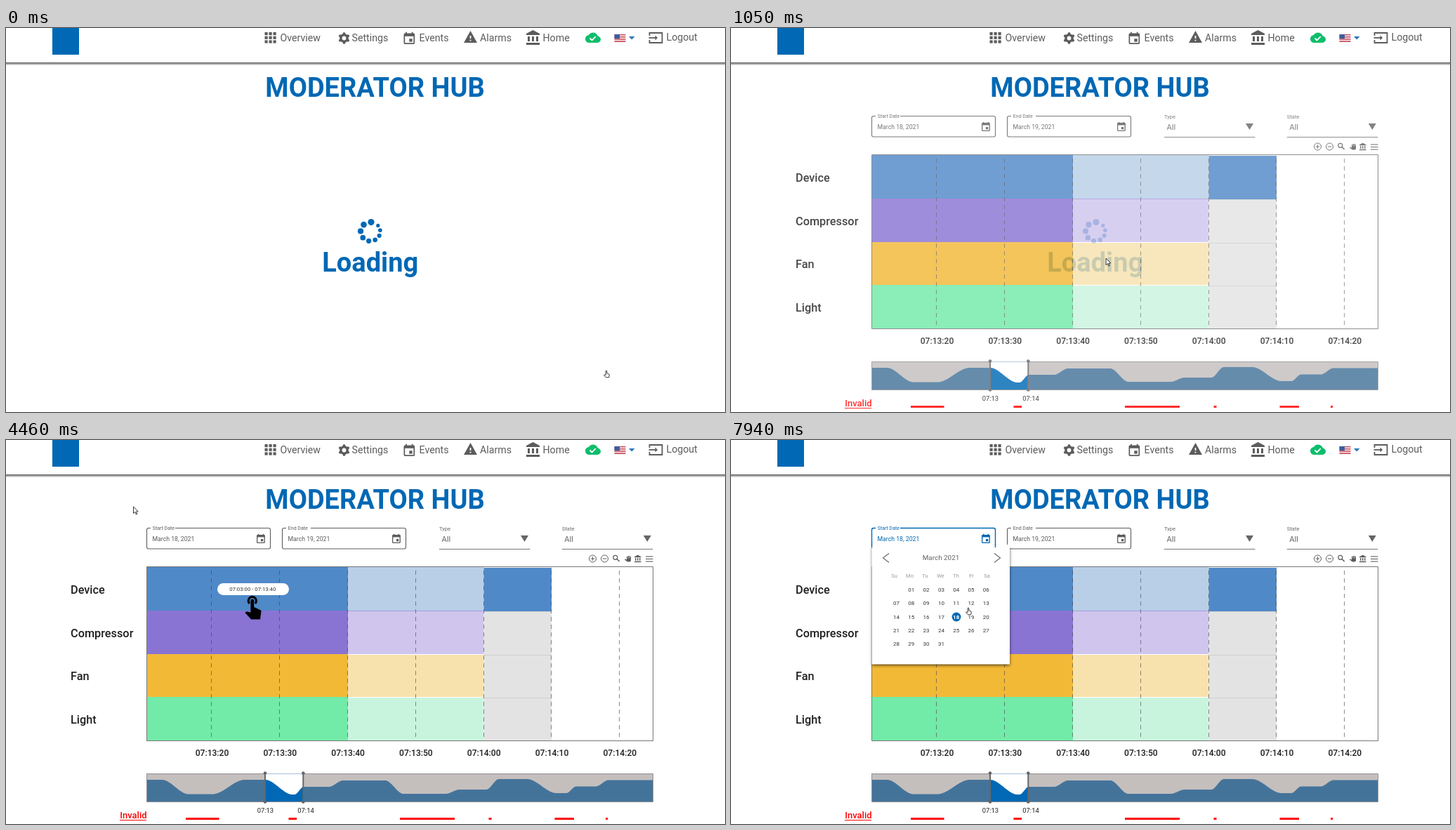
These frames come from a looping animation (1024 px wide and 547 px high, 8 s). An HTML page with a canvas:

```html
<!DOCTYPE html>
<html lang="en">
<head>
<meta charset="utf-8">
<title>Device timeline</title>
<style>
html, body { margin: 0; width: 100%; height: 100%; overflow: hidden; background: #fff; }
canvas { display: block; }
</style>
</head>
<body>
<canvas id="stage" width="1024" height="547"></canvas>
<script>
const W = 1024, H = 547, LOOP = 8000;
const BLUE = '#0068b4', GREY = '#5c5c5c', INK = '#1f1f1f';
const stage = document.getElementById('stage').getContext('2d');
let g = stage;

// Drawing helpers

function text(s, x, y, size, color, weight = 400, align = 'left') {
  g.font = `${weight} ${size}px Roboto, Arial, sans-serif`;
  g.textAlign = align;
  g.fillStyle = color;
  g.fillText(s, x, y);
}

function rect(x, y, w, h, color) {
  g.fillStyle = color;
  g.fillRect(x, y, w, h);
}

function box(x, y, w, h, r, color, width) {
  g.beginPath();
  g.roundRect(x, y, w, h, r);
  if (width) {
    g.strokeStyle = color;
    g.lineWidth = width;
    g.stroke();
  } else {
    g.fillStyle = color;
    g.fill();
  }
}

function trace(pts) {
  g.beginPath();
  for (let i = 0; i < pts.length; i += 2) g.lineTo(pts[i], pts[i + 1]);
}

function line(color, width, ...pts) {
  trace(pts);
  g.strokeStyle = color;
  g.lineWidth = width;
  g.stroke();
}

function poly(color, ...pts) {
  trace(pts);
  g.fillStyle = color;
  g.fill();
}

function dot(x, y, r, color) {
  box(x - r, y - r, 2 * r, 2 * r, r, color);
}

function ring(x, y, r, color, width = 1) {
  box(x - r, y - r, 2 * r, 2 * r, r, color, width);
}

function triangle(x, y, w, h, color) {
  poly(color, x, y, x + w, y, x + w / 2, y + h);
}

function at(x, y, scale, paint) {
  g.save();
  g.translate(x, y);
  g.scale(scale, scale);
  paint();
  g.restore();
}

function layer(paint) {
  const c = document.createElement('canvas');
  c.width = W;
  c.height = H;
  g = c.getContext('2d');
  paint();
  g = stage;
  return c;
}

// Icons

function dateIcon(x, y, scale, color) {
  at(x, y, scale, () => {
    box(1, 3, 16, 16, 1, color, 2);
    rect(1, 3, 16, 4, color);
    for (const tab of [3, 13]) rect(tab, 0, 2, 3, color);
    rect(9, 11, 5, 5, color);
  });
}

function bankIcon(x, y, scale) {
  at(x, y, scale, () => {
    poly(GREY, 0, 7, 0, 5, 9.5, 0, 19, 5, 19, 7);
    for (let i = 0; i < 3; i++) rect(2 + i * 6, 9, 3, 7, GREY);
    rect(0, 18, 19, 3, GREY);
  });
}

function gear(x, y) {
  g.beginPath();
  for (let i = 0; i < 24; i++) {
    const a = (i - .5) * Math.PI / 12, r = i % 4 < 2 ? 8.4 : 6.2;
    g.lineTo(x + r * Math.sin(a), y - r * Math.cos(a));
  }
  g.fillStyle = GREY;
  g.fill();
  dot(x, y, 2.9, '#fff');
}

function warning(x, y) {
  poly(GREY, x, y + 17, x + 9.5, y, x + 19, y + 17);
  rect(x + 8.6, y + 7, 1.8, 4, '#fff');
  rect(x + 8.6, y + 12.7, 1.8, 1.8, '#fff');
}

function cloud(x, y) {
  const green = '#0fbd6c';
  dot(x + 5.5, y + 9, 5.5, green);
  dot(x + 11, y + 7, 7, green);
  dot(x + 17.3, y + 9.8, 4.7, green);
  rect(x + 5, y + 9, 12, 5.5, green);
  line('#fff', 1.8, x + 6.5, y + 8, x + 9.5, y + 11, x + 14.8, y + 5.7);
}

function exit(x, y) {
  line(GREY, 1.8, x + 1, y + 5, x + 1, y + 1, x + 19, y + 1, x + 19, y + 15, x + 1, y + 15, x + 1, y + 11);
  line(GREY, 1.8, x, y + 8, x + 10, y + 8);
  poly(GREY, x + 9, y + 4.5, x + 12.5, y + 8, x + 9, y + 11.5);
}

function flag(x, y) {
  for (let i = 0; i < 7; i++) rect(x, y + i * 1.57, 16, 1.57, i % 2 ? '#f3e4e6' : '#c8414f');
  rect(x, y, 7.5, 6.2, '#3d5c9b');
}

function palm(x, y) {
  box(x - 1.5, y, 6, 5, 2, GREY);
  for (let i = 0; i < 4; i++) rect(x - 1.5 + i * 1.6, y - 4 + Math.abs(i - 1.5), 1.2, 6, GREY);
  line(GREY, 1.5, x - 4, y + 1.3, x, y + 4.3);
}

function pointingHand() {
  g.beginPath();
  g.arc(0, 1.5, 1.5, Math.PI, 0);
  for (const [x, y] of [[1.5, 7.5], [2.5, 7.5], [8, 10.3], [7, 18], [-1, 18], [-6.5, 12.2], [-5, 11], [-1.5, 12]])
    g.lineTo(x, y);
  g.closePath();
}

// Scenes

function header() {
  rect(0, 0, W, H, '#fff');
  for (let i = 0; i < 4; i++) rect(0, 49 + i, W, 1, `rgba(0,0,0,${.58 * (1 - i / 4)})`);
  rect(66, 0, 38, 38, BLUE);
  for (let i = 0; i < 9; i++) rect(368.5 + i % 3 * 6, 6 + (i / 3 | 0) * 5.7, 4.2, 4.2, GREY);
  gear(481.5, 14.5);
  dateIcon(566.5, 5.7, .87, GREY);
  warning(652, 4);
  bankIcon(741, 3, 1);
  cloud(825, 6.5);
  flag(866.5, 9);
  triangle(887, 12, 8.5, 4.5, '#2b78b8');
  exit(915.5, 6);
  const menu = { Overview: 390.5, Settings: 492.5, Events: 588.5, Alarms: 675, Home: 764.5 };
  for (const name in menu) text(name, menu[name], 19, 14.2, GREY);
  text('Logout', 940.5, 18, 14.2, GREY);
  text('MODERATOR HUB', 525.5, 98, 38, BLUE, 700, 'center');
}

function loading() {
  header();
  for (let i = 0; i < 9; i++) {
    const a = -(86 + 48 * i - 1.1 * i * i) * Math.PI / 180;
    dot(519 + 14 * Math.cos(a), 290 + 13.5 * Math.sin(a), 4.6 - i * .25, BLUE);
  }
  text('Loading', 518.7, 347, 38, BLUE, 700, 'center');
}

function dateField(x, label, value, color, width) {
  box(x + .5, 125.5, 176, 29.5, 2.5, color, width);
  rect(x + 6, 123, 35, 5, '#fff');
  text(label, x + 8.8, 128, 7, color);
  text(value, x + 8.5, 144, 8.7, color);
  dateIcon(x + 157, 133.8, .66, color);
}

function select(x, label) {
  text(label, x, 129, 7.6, '#666');
  text('All', x + 3.5, 145, 11.2, '#666');
  triangle(x + 116, 136, 11, 9, '#666');
  line('#777', 1, x, 155.5, x + 129.5, 155.5);
}

function toolbar() {
  for (const x of [835.5, 852.5]) {
    ring(x, 169, 5, GREY);
    line(GREY, 1, x - 2.7, 169, x + 2.7, 169);
  }
  line(GREY, 1, 835.5, 166.3, 835.5, 171.7);
  ring(867.8, 167.3, 3, GREY, 1.2);
  line(GREY, 1.5, 870, 169.5, 873.7, 173);
  palm(885.5, 168.5);
  bankIcon(895, 163.7, .5);
  for (let i = 0; i < 3; i++) line(GREY, 1.1, 911, 166 + i * 3.5, 921.5, 166 + i * 3.5);
}

const ROWS = [
  ['Device', '#5089c8', '#b8cfe7'],
  ['Compressor', '#8974d4', '#cfc5ed'],
  ['Fan', '#f2b937', '#f7e2ae'],
  ['Light', '#72eaa8', '#c8f4dd']
];

function chart() {
  ROWS.forEach(([name, full, pale], i) => {
    const y = Math.round(181 + 61.8 * i);
    text(name, 92, 219 + 61.7 * i, 16.3, INK, 500);
    rect(200.5, y, 286.5, 62, full);
    rect(487, y, 193.5, 62, pale);
    rect(680.5, y + 1, 96.5, 62, i ? '#e3e3e3' : full);
    if (i) {
      line('#cfcfcf', 1, 680.5, y + 1.5, 777, y + 1.5);
      line(i === 1 ? '#a99be0' : '#fff', 1, 487, y + .5, 680, y + .5);
    }
  });
  for (let i = 0; i < 7; i++) {
    const x = Math.round(292.4 + i * 96.8) + .5, sec = 20 + i * 10;
    g.setLineDash([6, 5]);
    line('rgba(70,70,70,.62)', 1, x, 186, x, 428);
    g.setLineDash([]);
    const clock = `07:${13 + (sec / 60 | 0)}:${String(sec % 60).padStart(2, '0')}`;
    text(clock, 293.5 + i * 96.8, 449.5, 12.1, INK, 500, 'center');
  }
  box(200.5, 180.5, 721, 248, 0, '#777', 1);
}

// Slopes of the overview curve: start, end, rise
const SLOPES = [[222, 260, 20.5], [294, 340, -20.5], [369, 408, 21], [411, 424, -11], [460, 480, -9],
  [540, 566, 19], [626, 646, -6], [684, 702, -15], [742, 784, 20], [798, 812, -9.5], [840, 858, -9]];

function smooth(u) {
  u = Math.max(0, Math.min(1, u));
  return u * u * (3 - 2 * u);
}

function wave(color) {
  const pts = [200, 515];
  for (let x = 200; x <= 921; x++)
    pts.push(x, SLOPES.reduce((y, [a, b, d]) => y + d * smooth((x - a) / (b - a)), 484));
  poly(color, ...pts, 921, 515);
}

function slider() {
  rect(200, 475, 721, 40, '#c4bfbd');
  wave('#44739a');
  g.save();
  g.beginPath();
  g.rect(369, 475, 54, 40);
  g.clip();
  rect(369, 475, 54, 40, '#fff');
  wave(BLUE);
  g.restore();
  box(200.5, 475.5, 721, 40, 0, '#8f8f93', 1);
  line('#a9bfe0', 1, 369, 475.5, 423, 475.5);
  for (const x of [369, 423.3]) {
    line('#666', 2, x, 474, x, 516);
    dot(x, 474.5, 2.3, '#666');
    dot(x, 515.5, 2.3, '#666');
  }
  text('07:13', 369.3, 531, 9.4, INK, 400, 'center');
  text('07:14', 427, 531, 9.4, INK, 400, 'center');
}

function page() {
  header();
  dateField(200, 'Start Date', 'March 18, 2021', GREY, 1.1);
  dateField(393, 'End Date', 'March 19, 2021', GREY, 1.1);
  select(617, 'Type');
  select(791.8, 'State');
  toolbar();
  chart();
  slider();
  text('Invalid', 162.3, 539, 13, '#f00', 500);
  line('#f00', 1, 162, 541.5, 200, 541.5);
  for (const [x, w] of [[256, 47.5], [402.5, 11.5], [561, 78], [687.5, 4], [781.5, 27.5], [854, 3]])
    rect(x, 538, w, 3, '#f00');
}

function tip() {
  box(301, 204, 102, 17, 8.5, '#fff');
  text('07:03:00 - 07:13:40', 351.3, 215.3, 7.8, '#333', 400, 'center');
  at(350.8, 226.6, 1.6, () => {
    pointingHand();
    g.fillStyle = '#000';
    g.fill();
    g.lineWidth = 2;
    g.beginPath();
    g.arc(0, 1.5, 3.5, Math.PI * .75, Math.PI * .25);
    g.stroke();
  });
}

function calendar() {
  rect(198, 123, 180, 32, '#fff');
  dateField(200, 'Start Date', 'March 18, 2021', BLUE, 1.4);
  g.shadowColor = 'rgba(0,0,0,.65)';
  g.shadowBlur = 4;
  g.shadowOffsetY = 1;
  rect(200.5, 153, 196.5, 166.5, '#fff');
  g.shadowColor = 'transparent';
  rect(198, 149, 201, 4, '#fff');
  for (const x of [200.5, 376.5]) line(BLUE, 1.4, x, 148, x, 153);
  line('#666', 1.1, 225, 161.5, 216.5, 168, 225, 174.5);
  line('#666', 1.1, 375, 161.5, 383.5, 168, 375, 174.5);
  text('March 2021', 299, 171, 9.9, '#666', 400, 'center');
  ['Su', 'Mo', 'Tu', 'We', 'Th', 'Fr', 'Sa'].forEach((s, i) =>
    text(s, 232.5 + i * 22, 196, 7.6, '#999', 400, 'center'));
  dot(321, 252, 6.4, BLUE);
  for (let d = 1; d <= 31; d++) {
    const x = 235.5 + d % 7 * 21.3, y = 215.7 + (d / 7 | 0) * 19.4, on = d === 18;
    text(String(d).padStart(2, '0'), x, y, 8, on ? '#fff' : '#333', on ? 700 : 400, 'center');
  }
}

// Motion

// First step, last step, then where the pointer ends
const MOVES = [
  [70, 430, 534, 328],
  [1520, 1982, 278.5, 139], [2060, 2290, 234, 184], [2360, 2820, 319, 214],
  [3620, 3850, 397, 238], [3930, 4380, 209, 128], [4460, 4780, 116, 16],
  [6110, 6340, 205, 105], [6490, 6790, 288, 138], [6860, 7020, 274, 138.5],
  [7790, 7940, 338, 239]
];
const CLICKS = [[660, 810], [2990, 3140], [5080, 5390], [7170, 7330]];
const STEP = 76;

// Progress in even jumps, the first one already at the first step
function progress(t, first, last) {
  if (t < first) return 0;
  const gaps = Math.round((last - first) / STEP);
  const k = Math.floor((t - first) / (last - first) * gaps + .12) + 1;
  return Math.min(1, k / (gaps + 1));
}

function fade(t, first, last) {
  return 1 - (1 - progress(t, first, last)) ** 2;
}

function pointer(t) {
  let x = 855, y = 488;
  for (const [first, last, toX, toY] of MOVES) {
    const u = progress(t, first, last), e = u * (1.6 - .6 * u);
    x += (toX - x) * e;
    y += (toY - y) * e;
  }
  return [x, y];
}

function isHand(t, x, y) {
  const inField = x > 215 && x < 376 && y > 125 && y < 155;
  const onLogo = y < 38 && x < 161 && t < 5390;
  return t < 810 || inField || onLogo || t >= 7330;
}

function cursor(t) {
  const [x, y] = pointer(t);
  if (CLICKS.some(([a, b]) => t >= a && t < b)) ring(x - .5, y, 6.3, 'rgba(90,90,90,.45)');
  const hand = isHand(t, x, y);
  at(x, y, hand ? .54 : 1, () => {
    if (hand) pointingHand();
    else {
      trace([0, 0, 0, 9.6, 2.3, 7.6, 3.9, 11.2, 5.4, 10.5, 3.8, 7.2, 6.7, 7]);
      g.closePath();
    }
    g.fillStyle = '#fff';
    g.fill();
    g.strokeStyle = '#333';
    g.lineWidth = hand ? 1.8 : 1;
    g.stroke();
  });
}

const [busy, main, hint, picker] = [loading, page, tip, calendar].map(layer);

function show(image, alpha) {
  g.globalAlpha = alpha;
  g.drawImage(image, 0, 0);
  g.globalAlpha = 1;
}

function frame(now) {
  const t = now % LOOP;
  show(busy, 1);
  show(main, fade(t, 810, 1290));
  show(hint, fade(t, 3140, 3390) - fade(t, 5390, 5640));
  show(picker, fade(t, 7330, 7630));
  cursor(t);
  requestAnimationFrame(frame);
}
requestAnimationFrame(frame);
</script>
</body>
</html>
```
